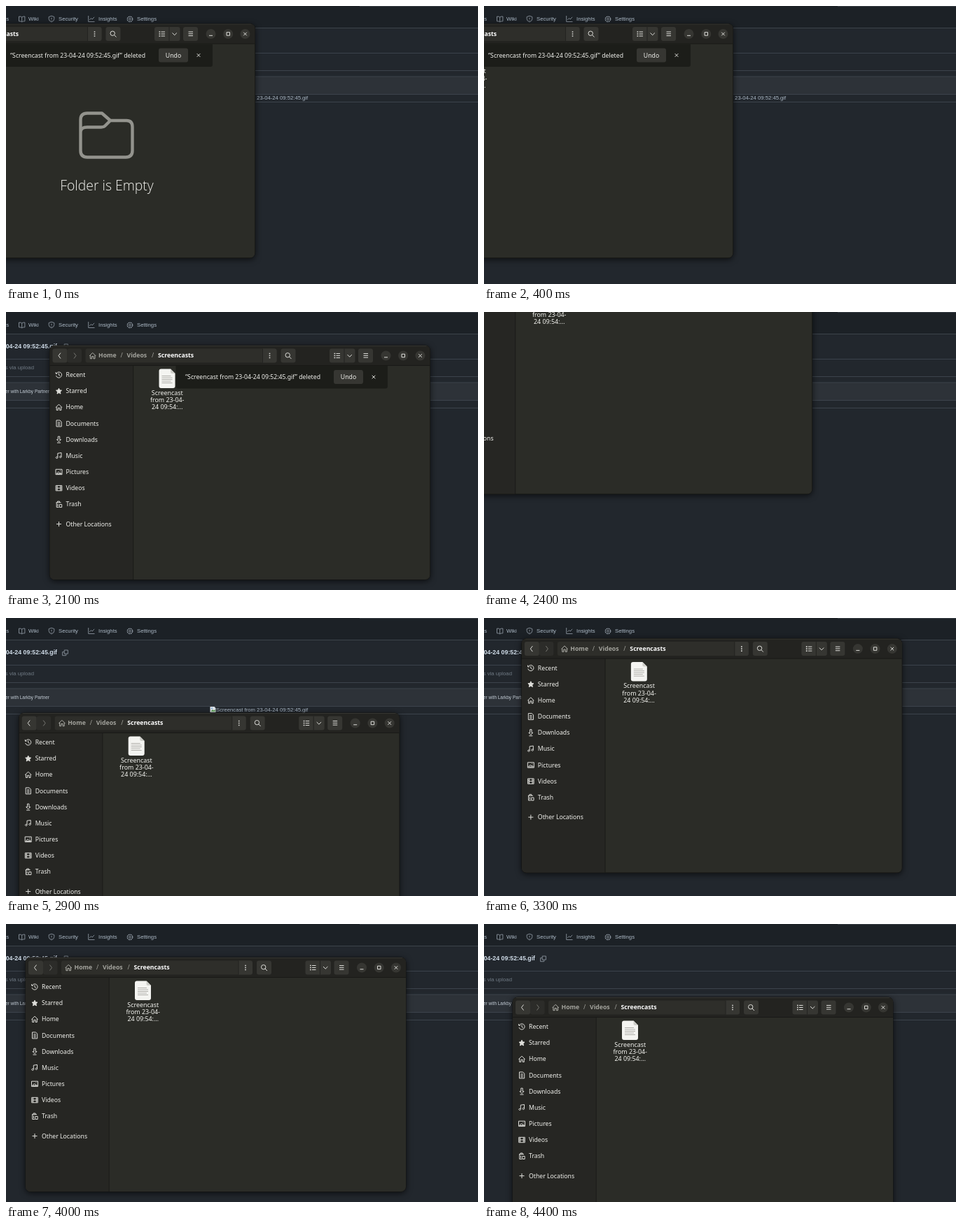
These frames come from a looping animation (674x398 px, 4.9 s). An HTML page:

```html
<!DOCTYPE html>
<html lang="en">
<head>
<meta charset="utf-8">
<title>Dragging a file window</title>
<style>
  html, body { margin: 0; width: 100%; height: 100%; overflow: hidden; background: #22272d; }
  svg { display: block; }
  .page { font: 7.75px "Liberation Sans", Arial, sans-serif; fill: #adbac7; }
  .app { font: 8.7px "Noto Sans", "Open Sans", sans-serif; fill: #f2f2ee; }
  .bold { font-weight: 700; }
  .mid { text-anchor: middle; }
  .end { text-anchor: end; }
  .dim { fill: #a3a39d; }
  .btn { fill: #363632; }
  .line { fill: none; stroke: #dededa; stroke-width: 1; }
  .tab { fill: none; stroke: #8b949e; stroke-width: .9; }
  .rule { stroke: #3c434b; }
  .shadow { filter: drop-shadow(0 2px 4px rgba(0, 0, 0, .65)); }
</style>
</head>
<body>
<svg width="674" height="398" viewBox="0 0 674 398">
  <defs>
    <clipPath id="frame"><rect width="543" height="335" rx="7"/></clipPath>
  </defs>

  <!-- web page -->
  <rect width="674" height="398" fill="#22272d"/>
  <rect width="674" height="32" fill="#1c2126"/>
  <path d="M505 .5H674" stroke="#3a4047"/>
  <rect y="101" width="674" height="25" fill="#2d3238"/>
  <path class="rule" d="M0 31.5H674M0 67.5H674M0 92.5H674M0 101H674M0 126.5H674M0 137.5H674"/>
  <g class="page">
    <text x="4" y="20.7" class="end">s</text>
    <text x="32" y="20.7">Wiki</text>
    <text x="75" y="20.7">Security</text>
    <text x="132" y="20.7">Insights</text>
    <text x="187" y="20.7">Settings</text>
    <text x="73" y="52.2" class="bold end" font-size="8.8" fill="#cdd9e5">23-04-24 09:52:45.gif</text>
    <text x="40" y="81.7" class="end" fill="#6f7983">s via upload</text>
    <text x="62" y="115.8" class="end" font-size="6.45" fill="#c3ccd5">er with Larkby Partner</text>
    <text x="300" y="133.8" font-size="7.7">Screencast from 23-04-24 09:52:45.gif</text>
  </g>
  <g class="tab">
    <path d="M22.7 16q-1-1.2-4.2-1v6.8q3.2-.2 4.2 1q1-1.2 4.2-1V15q-3.2-.2-4.2 1v6.8"/>
    <path d="M65 14.2l3.8 1.3v3q0 2.8-3.8 4.4q-3.8-1.6-3.8-4.4v-3zM65 16.7v2.4M65 20.3v1"/>
    <path d="M117.7 14v8.5h8.8M119.3 19.8l2.2-2.3 1.6 1.5 3-3.2"/>
    <circle cx="177" cy="18.8" r="3.7" stroke-width="1.4" stroke-dasharray="2.2 .7"/>
    <circle cx="177" cy="18.8" r="1.4"/>
    <path d="M83.2 46h5.2v5.2h-5.2zM83 48.6h-2.4v5.1h5.2v-2.3"/>
  </g>
  <path d="M291.5 127h6l2 2v6h-8z" fill="#dfe5ea"/>
  <path d="M292.5 134l2.4-3 1.8 1.5 2-1.5v3z" fill="#62a55a"/>
  <circle cx="294" cy="129.3" r="1.1" fill="#7cabd9"/>

  <!-- file manager -->
  <g id="win" class="app">
    <rect class="shadow" x="-.5" y="-.5" width="544" height="336" rx="7.5" fill="#151513"/>
    <g clip-path="url(#frame)">
      <rect width="543" height="335" fill="#2b2c27"/>
      <rect width="119" height="335" fill="#262623"/>
      <path d="M119.2 28V335" stroke="#1b1b19"/>
      <rect width="543" height="28.5" fill="#232320"/>
      <path d="M0 28.5H543" stroke="#191917"/>
      <path d="M5 .5H538" stroke="#363632"/>
    </g>

    <rect class="btn" x="4" y="4.5" width="21" height="20" rx="3"/>
    <rect x="25" y="4.5" width="20.5" height="20" rx="3" fill="#2c2c29"/>
    <rect x="51" y="4.5" width="273" height="20" rx="3" fill="#2e2e2a"/>
    <path class="btn" d="M304 4.5h17q3 0 3 3v14q0 3-3 3h-17z"/>
    <rect class="btn" x="330" y="4.5" width="21" height="20" rx="3"/>
    <rect class="btn" x="399.5" y="4.5" width="36.5" height="20" rx="3"/>
    <path d="M420.5 4.5v20M304 4.5v20" stroke="#232320"/>
    <rect class="btn" x="440.5" y="4.5" width="21" height="20" rx="3"/>
    <g class="btn">
      <circle cx="480" cy="14.5" r="7"/><circle cx="504.7" cy="14.5" r="7"/><circle cx="529" cy="14.5" r="7"/>
    </g>
    <g class="line">
      <path d="M15.5 10.5l-3 4 3 4"/>
      <path d="M34.5 10.5l3 4-3 4" stroke="#777772"/>
      <circle cx="339.7" cy="13.7" r="3.2"/>
      <path d="M342 16l3 3"/>
      <path d="M409 11.5h5.5M409 14.5h5.5M409 17.5h5.5"/>
      <path d="M406 11.5h1.7M406 14.5h1.7M406 17.5h1.7" stroke-width="1.6"/>
      <path d="M425 13l3.2 3.2L431.4 13"/>
      <path d="M448 11.5h6.5M448 14.3h6.5M448 17.1h6.5"/>
      <path d="M477.5 16.8h5M502.5 12.2h4.5v4.5h-4.5zM526.7 12.2l4.6 4.6M531.3 12.2l-4.6 4.6"/>
      <path d="M314 10.7v1.6M314 13.7v1.6M314 16.7v1.6" stroke-width="1.6"/>
    </g>
    <g id="crumbHome" transform="translate(61.2 14.5)"></g>
    <g class="bold dim">
      <text x="69.5" y="17.4">Home</text>
      <text x="101" y="17.4" font-weight="400">/</text>
      <text x="110" y="17.4">Videos</text>
      <text x="145.5" y="17.4" font-weight="400">/</text>
      <text x="154.5" y="17.4" fill="#fff">Screencasts</text>
    </g>

    <g id="places"></g>

    <g id="file">
      <path d="M159 33.5h13.5l6.5 6.5v18q0 3-3 3h-17q-3 0-3-3v-21.500q0-3 3-3z" fill="#f4f4f1"/>
      <path d="M172.500 33.500v4.500q0 2 2 2h4.500z" fill="#cfcfca"/>
      <path d="M160 43.500h13M160 46h15M160 48.500h15M160 51h13M160 53.500h15" stroke="#aaa9a4" stroke-width=".9"/>
      <g class="mid" font-size="8.9">
        <text x="167.7" y="70.700">Screencast</text>
        <text x="167.7" y="81.200">from 23-04-</text>
        <text x="167.7" y="91.400">24 09:54:…</text>
      </g>
    </g>

    <g id="empty">
      <g transform="translate(187.5 -25.5)" fill="none" stroke="#93938d" stroke-width="4.4" stroke-linejoin="round">
        <path d="M106.500 180V163Q106.500 153.500 116 153.500H137L149 164H172Q180.500 164 180.500 173V207Q180.500 216.500 171 216.500H116Q106.500 216.500 106.500 207V180Q107 173.500 116 173.500H136Q140 173.500 142 171L149 164"/>
      </g>
      <text class="mid" x="331.5" y="238.500" font-size="19.4" font-weight="300" font-family="Open Sans, Noto Sans, sans-serif">Folder is Empty</text>
    </g>

    <g id="toast">
      <path d="M180 29H482.500V58.500Q482.500 61.500 479.500 61.500H183Q180 61.500 180 58.500z" fill="#1c1d19"/>
      <text x="193.500" y="48">“Screencast from 23-04-24 09:52:45.gif” deleted</text>
      <rect class="btn" x="405.500" y="35" width="42" height="20" rx="3"/>
      <text class="mid" x="426.500" y="48">Undo</text>
      <path class="line" d="M460.200 42.700l4.600 4.600M464.800 42.700l-4.600 4.600"/>
    </g>
  </g>
</svg>
<script>
const $ = id => document.getElementById(id);

// Sidebar: label and outline icon drawn around (0, 0)
const home = "M-4.500 .3L0-4.200 4.500 .3M-3.300-.5V4.200H-1.200V1H1.200V4.200H3.300V-.5";
const places = [
  ["Recent", "M-3.500-2.200A4.100 4.100 0 1 1-4 1M-4.300-4v2.300h2.300M0-2.500V.3L2 1.500"],
  ["Starred", "M0-4L1.200-1.300 4-1 1.900 1 2.500 3.900 0 2.400-2.500 3.900-1.900 1-4-1-1.200-1.300z"],
  ["Home", home],
  ["Documents", "M-3.500-4.500H1.500L3.700-2.300V4.500H-3.500zM-1.700-1.500H1.800M-1.700 .5H1.800M-1.700 2.500H1.800"],
  ["Downloads", "M-1.200-4.500H1.200V0H3L0 3 -3 0H-1.200zM-2.500 4.500H2.500"],
  ["Music", "M-1.700 3V-3.500L3.500-4.300V2M-1.700 3a1.300 1.100 0 1 1-.1-.8M3.500 2a1.300 1.100 0 1 1-.1-.8"],
  ["Pictures", "M-4.500-3.700H4.500V3.700H-4.500zM-3.300 2.500L-.8-.3 1 1.500 2 .7 3.500 2.500zM1.500-1.700h1"],
  ["Videos", "M-4.300-3.700H4.300V3.700H-4.300zM-2.300-3.700V3.700M2.300-3.700V3.700M-2.300 0H2.300M-4-1.200h1.500M-4 1.200h1.500M2.500-1.200H4M2.500 1.200H4"],
  ["Trash", "M-4-2.500H3M-2-2.500V-4.200H1V-2.500M-3.300-2.500V4.300H0M-1.500-.5V3M.8 .3H4.200V4.300H.8z"],
  ["Other Locations", "M-3.500 0H3.500M0-3.500V3.500"]
];
$("crumbHome").innerHTML = `<path class="line" d="${home}" style="stroke:#b0b0aa"/>`;
$("places").innerHTML = places.map(([label, icon], i) => {
  const y = 42 + 23.150 * i + (i === 9 ? 5.200 : 0);
  const fill = label === "Starred" ? "#dededa" : "none";
  return `<path class="line" d="${icon}" style="fill:${fill}" transform="translate(13 ${y})"/>
    <text x="23" y="${y + 3.100}">${label}</text>`;
}).join("");

// Drag path of the window: time, left, top
const LOOP = 4900, STEP = 100;
const path = [
  [1800, -187.5, 25.5], [2000, -40, 60], [2200, 122, 20], [2400, -74.5, -74.5],
  [2500, -60, -20], [2700, 130, 60], [2900, 18.700, 136], [3200, -20, 30],
  [3400, 130, 60], [3600, 87.5, 215.3], [3800, 0, 65], [3900, -10, 22],
  [4000, 28, 48], [4200, 48, 110], [4300, 33, 116], [4400, 41, 105]
];

// Smooth curve through the path points
function position(t) {
  const last = path.length - 1;
  if (t <= path[0][0]) return path[0].slice(1);
  if (t >= path[last][0]) return path[last].slice(1);
  const i = path.findIndex(p => p[0] > t) - 1;
  const a = path[i], b = path[i + 1], span = b[0] - a[0], u = (t - a[0]) / span;
  const slope = (k, c) => k === 0 || k === last ? 0
    : (path[k + 1][c] - path[k - 1][c]) / (path[k + 1][0] - path[k - 1][0]) * span;
  return [1, 2].map(c =>
    a[c] + (b[c] - a[c]) * u * u * (3 - 2 * u)
    + slope(i, c) * u * (1 - u) ** 2 - slope(i + 1, c) * u * u * (1 - u));
}

const show = (id, on) => $(id).setAttribute("visibility", on ? "visible" : "hidden");

function draw() {
  const t = Math.floor(performance.now() % LOOP / STEP) * STEP;
  $("win").setAttribute("transform", `translate(${position(t)})`);
  show("empty", t < 100);
  show("file", t >= 100);
  show("toast", t < 2200);
  requestAnimationFrame(draw);
}
draw();
</script>
</body>
</html>
```
